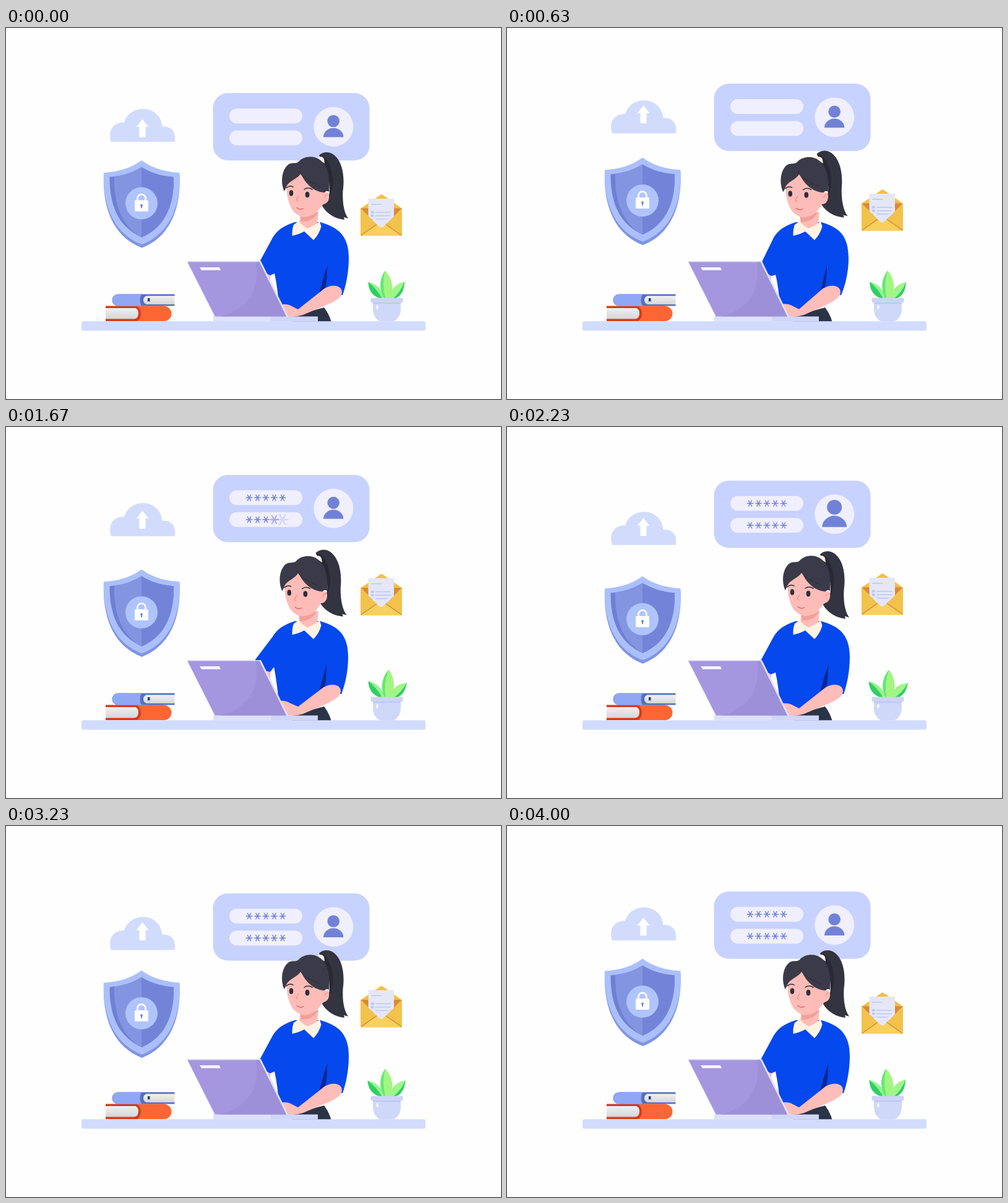
Animation, 800 px wide and 600 px high, one loop 4.03 s. Source, as an HTML page:

```html
<!DOCTYPE html>
<html lang="en">
<head>
<meta charset="utf-8">
<title>Secure sign-in</title>
<style>
  html, body { margin: 0; width: 100%; height: 100%; overflow: hidden; background: #fefefe; }
  svg { display: block; width: 100vw; height: 100vh; }
</style>
</head>
<body>
<svg viewBox="0 0 800 600">
  <defs>
    <path id="star" d="M-5.300 0H5.300M-2.900 -5L2.900 5M2.900 -5L-2.900 5" stroke="#7182d6" stroke-width="1.400" fill="none"/>
    <linearGradient id="pages" x1="0" y1="0" x2="0" y2="1">
      <stop offset="0" stop-color="#f0f0f0"/><stop offset="1" stop-color="#d6d6d8"/>
    </linearGradient>
  </defs>

  <g id="card">
    <rect x="334.5" y="105.2" width="253" height="108.8" rx="24" fill="#c7d2fe"/>
    <g fill="#f0effd">
      <rect x="361" y="130" width="118" height="24" rx="12"/>
      <rect x="361" y="165.5" width="118" height="24" rx="12"/>
      <circle cx="529.3" cy="159.5" r="32"/>
    </g>
    <g id="user" fill="#7182d6">
      <circle cx="529.2" cy="150.3" r="9.8"/>
      <path d="M513 176.300A16.200 14.800 0 0 1 545.400 176.300Z"/>
    </g>
    <g id="stars"></g>
  </g>

  <path id="cloud" fill="#d1dcfd" d="M170 185C164 168 173 152.500 191 153.500C195 140 207 131.500 221 131.500C238 131.500 251 143 252.500 160C268 159 276 170 272.500 185Z"/>
  <path id="arrow" fill="#fff" d="M220.500 148L230.500 160.500H225.500V177H215.500V160.500H210.500Z"/>

  <g id="shield">
    <path fill="#7f95e2" d="M219 221Q240 238 280.500 238C283 292 265 338 219.500 355.500C174 338 156 292 158 238Q198 238 219 221Z"/>
    <path fill="#abc0fb" d="M219 214Q243 232 280.500 234C283 287 265 333 219.500 350C174 333 156 287 158 234Q195 232 219 214Z"/>
    <path fill="#6e80d4" d="M219 225Q241 239 271 241C272 287 257 322 219.500 338.500C182 322 167 287 167.500 241Q197 239 219 225Z"/>
    <path fill="#8395e0" d="M219 225V338.500C188 321 174 287 175 240Q199 238 219 225Z"/>
    <path fill="#7384d8" d="M219 225V338.500C257 322 272 287 271 241Q241 239 219 225Z"/>
    <circle cx="219" cy="283.500" r="26" fill="#b0c4fc"/>
    <path d="M212.500 280V275.500A6.500 6.500 0 0 1 225.500 275.500V280" fill="none" stroke="#fff" stroke-width="2.600"/>
    <rect x="208" y="278.500" width="22" height="18" rx="1.500" fill="#fff"/>
    <path d="M219 284.800a2 2 0 0 1 1 3.700V291.500h-2V288.500a2 2 0 0 1 1 -3.700Z" fill="#7182d6"/>
  </g>

  <g id="mail">
    <path d="M573 292L605 270Q607 268.500 609 270L640 292Z" fill="#f2c044"/>
    <path d="M573 291.500H640L607 326Z" fill="#d78b36"/>
    <path d="M585.500 276H627V306L607 324.500L585.500 306Z" fill="#e5e7f7"/>
    <g stroke="#b9c5f3" stroke-width="1.400">
      <path d="M590 285H607M597 298H622M597 303.500H622M597 309H622M612 316H618"/>
      <path d="M590 298H594.500M590 303.500H594.500M590 309H594.500" stroke-width="3.500"/>
    </g>
    <path d="M573 291.500L603 321.500Q606.500 325 610 321.500L640 291.500V336H573Z" fill="#f3c24b"/>
    <path d="M573 336L602 316.500Q606.500 313.500 611 316.500L640 336Z" fill="#f9d05c" clip-path="inset(0)"/>
    <path d="M574 335L599 317.500M639 335L614 317.500" stroke="#d4933c" stroke-width="1.500"/>
    <path d="M585.500 303L603 321Q606.500 324.500 610 321L627 303L607 314Z" fill="#e5e7f7"/>
  </g>

  <path d="M464 466L514 452Q522 462 525.500 475H462Z" fill="#2b3347"/>
  <g id="woman">
    <path id="leftHand" fill="#fdbcb7"/>
    <path id="leftArm" fill="#0448ee"/>
    <path id="torso" fill="#0448ee"/>
    <path id="sleeve" fill="#0448ee"/>
    <path id="fold" fill="#04278f"/>
    <path id="forearm" fill="#febdb9"/>
    <path d="M476 298H505L503 317L486 330L474 315Z" fill="#fdbcb7"/>
    <g id="head">
      <g id="tail">
        <path fill="#343340" d="M506 206C512 200 523 199 531 206C546 219 547 246 544.500 263C543.500 282 546 298 553 308L546 306L547 310C532 309 518 300 510.500 287C522 281 526 266 524 248Z"/>
        <path fill="#292835" d="M507 206C519 208 526 224 528 242C530 257 525 271 520 277Q526 262 520 240Z"/>
      </g>
      <path fill="#f8f1e6" d="M504 209Q511 206 514 212L515 219L507 214Z"/>
      <path fill="#f29f99" d="M476 303Q490 309 505 296L503 301Q494 314 477 313Z"/>
      <path fill="#fdbcb7" d="M453 246C453 270 456 284 464 296Q472 304 481 306C494 305 506 297 512 285C520 285 523 277 522 270Q521 264 515 266L508 232L470 226Z"/>
      <path fill="#3b3a48" d="M449.500 264C443 249 446 229 456 221C463 216 470 221 474 215C484 206 499 207 507 213C521 222 524 244 522 265Q518 262 515 266C502 266 485 256 476.500 235C470 246 455 247 452.500 259Z"/>
      <path d="M474 232C481 246 496 249 507 256" stroke="#2c2b37" fill="none"/>
      <g fill="#302d3a">
        <ellipse cx="461" cy="267" rx="3.300" ry="4.700"/><ellipse cx="487" cy="269.500" rx="3.400" ry="4.700"/>
      </g>
      <g fill="none" stroke-linecap="round">
        <path d="M453.500 258.500Q458 254 464 257M482 261Q488 256.500 495 261" stroke="#302d3a" stroke-width="1.500"/>
        <path d="M473 271Q471 275 469 278L472 280" stroke="#ec8580"/>
        <path d="M470 290.500Q475 295 480.500 292" stroke="#d95f66" stroke-width="1.200"/>
        <path d="M515 274Q517 269 520 270" stroke="#ec8580"/>
      </g>
    </g>
    <path fill="#fdf3e4" d="M473 312.500L465 318Q462 326 462.500 336Q473 334 482 329L497 343Q506 334 509.500 321L507 313Q496 321 487 324Q478 319 473 312.500Z"/>
  </g>

  <path d="M335 466H456V474.500H335Z" fill="#dee1f9"/>
  <path d="M428 466.500H504V474.500H428Z" fill="#d0d6f6"/>
  <path d="M292 377H412L456.500 467H337Z" fill="#dfe0fa"/>
  <path d="M293.500 378.500H409.500L453 466.500H338Z" fill="#a497df"/>
  <path d="M404 378.500H409.500L453 466.500H346C389 455 411 427 404 378.500Z" fill="#9d90d9"/>
  <path d="M313 387H345L347 391.800H316Z" fill="#f7f5ff"/>

  <g id="books">
    <path d="M161 449.500H255A12.300 12.300 0 0 1 255 474H161V470H210V453H161Z" fill="#d83a17"/>
    <path d="M161 453H207Q214 453 214 461.500T207 470.500H161Z" fill="url(#pages)"/>
    <path d="M216 450H255.500A12 12 0 0 1 255.500 474H212Q218 470 218 462T212 450Z" fill="#fc6635"/>
    <path d="M272.500 430.500H181A9.500 9.500 0 0 0 181 449.500H272.500V446.500H226V433.500H272.500Z" fill="#5570bf"/>
    <path d="M219 430.500H181.500A9.500 9.500 0 0 0 181.500 449.500H219Q214 440 219 430.500Z" fill="#90a7f4"/>
    <path d="M272.500 433.500H228Q222 434 222 440T228 446.800H272.500Z" fill="url(#pages)"/>
    <path d="M229 437H232.500V443L230.800 441.500L229 443Z" fill="#1c3b86"/>
  </g>

  <g id="leafLeft">
    <path d="M606 438C590 433 586 422 585.500 411C599 415 608 425 611 438Z" fill="#2fcf63"/>
    <path d="M608 438Q599 421 585.500 411C601 414 609 425 612 438Z" fill="#92f58e"/>
  </g>
  <g id="leafRight">
    <path d="M619 438C621 422 630 414 644 410C643 424 637 433 626 438Z" fill="#a0f58a"/>
    <path d="M625 438Q638 427 644 410C643.500 426 638 434 628 438Z" fill="#2fcf63"/>
  </g>
  <g id="leafMid">
    <path d="M612 438C601 420 605 404 612.500 392.500C624 404 629 423 619 438Z" fill="#a3f582"/>
    <path d="M612 438C601 420 605 404 612.500 392.500Q607 416 613.500 438Z" fill="#62e878"/>
  </g>
  <path d="M593 443H638V455Q637 470 626 474.500H605Q594 470 593 455Z" fill="#cfd8f9"/>
  <path d="M593 443.500H638V446H593Z" fill="#bcc7f0"/>
  <rect x="589.500" y="436.500" width="52" height="7.500" rx="1.500" fill="#cdd4f5"/>
  <ellipse cx="600" cy="451.500" rx="1.800" ry="3.600" fill="#f3f5ff"/>

  <rect x="122" y="474.300" width="556" height="15.200" rx="3" fill="#d1dcfd"/>
</svg>
<script>
const LOOP = 4030;
const byId = id => document.getElementById(id);
const set = (id, name, value) => byId(id).setAttribute(name, value);
const clamp = x => Math.max(0, Math.min(1, x));
const smooth = (t, from, to) => {
  const p = clamp((t - from) / (to - from));
  return p * p * (3 - 2 * p);
};
// Cosine wave that peaks at the given time.
const wave = (t, peak, cycles = 1) => Math.cos((t - peak) / LOOP * 2 * Math.PI * cycles);
const move = (id, y) => set(id, 'transform', `translate(0 ${y})`);

// Smooth curve through [time, value] keys, at rest at both ends.
function curve(keys, t) {
  const last = keys.length - 1;
  if (t >= keys[last][0]) return keys[last][1];
  const i = keys.findIndex((k, n) => n < last && t < keys[n + 1][0]);
  const slope = n => n <= 0 || n >= last ? 0 :
    (keys[n + 1][1] - keys[n - 1][1]) / (keys[n + 1][0] - keys[n - 1][0]);
  const [t0, a] = keys[i], [t1, b] = keys[i + 1];
  const d = t1 - t0, p = (t - t0) / d, q = 1 - p;
  return a * (1 + 2 * p) * q * q + b * p * p * (3 - 2 * p) +
    d * p * q * (slope(i) * q - slope(i + 1) * p);
}

const poseTimes = [0, 630, 1030, 1670, 2130];
const pose = (t, ...values) => curve(poseTimes.map((time, i) => [time, values[i]]), t);

const stars = Array.from({ length: 10 }, () => {
  const star = document.createElementNS('http://www.w3.org/2000/svg', 'use');
  star.setAttribute('href', '#star');
  return byId('stars').appendChild(star);
});

function drawStars(t) {
  stars.forEach((star, i) => {
    const p = clamp((t - 650 - i * 107) / 267);
    const x = 393 + i % 5 * 13.5, y = i < 5 ? 142 : 177.500;
    star.setAttribute('transform', `translate(${x} ${y}) scale(${2 - p})`);
    star.setAttribute('opacity', p);
  });
}

function drawWoman(t) {
  const lean = smooth(t, 0, 560) - smooth(t, 1690, 2130);
  const elbow = pose(t, 0, -4, -6, -2, 0);
  const reach = pose(t, 0, 2, -3.5, -8, 0);
  const hand = pose(t, 0, -0.5, -4, -4, 0);
  const side = 554 + pose(t, 0, -2, -2, -1, 0);
  const armpit = `${434 + reach * .1} ${397 + reach * 1.1}`;

  set('head', 'transform', `translate(${-2.5 * lean} ${0.5 * lean}) rotate(${-lean} 488 310)`);
  set('tail', 'transform', `translate(${-lean} ${-2.5 * lean}) rotate(${-0.8 * lean} 515 215)`);
  set('leftHand', 'd', `M412 386L428 ${396 + reach * .5}L427 407L424 412Z`);
  set('leftArm', 'd', `M467 314C448 320 438 327 431 339L${411 + reach} 376L${407 + reach} 390
    L427 ${400 + reach * .5}L${armpit}L460 380Z`);
  set('torso', 'd', `M467 314L508 314Q530 322 535 345L518 385L508 430L500 448L470 460L441 449
    Q439 420 ${armpit}L431 339Z`);
  set('sleeve', 'd', `M507 314C537 322 ${side} 336 ${side} 372
    C${side} 396 ${549 + elbow * .7} 418 ${544 + elbow} 432
    L${528 + elbow} 430L${506 + elbow * .3} 432L518 385L505 340Z`);
  set('fold', 'd', `M${519 + elbow * .5} 383L506 429L${516 + elbow * .6} 420
    Q${519 + elbow * .7} 410 ${519 + elbow * .5} 383Z`);
  set('forearm', 'd', `M${515 + elbow} 421Q${530 + elbow} 413 ${540 + elbow} 420
    Q${546 + elbow} 426 ${540 + elbow} 435Q${535 + elbow} 440 ${525 + elbow * .7} 445L480 464
    Q464 469 ${450 + hand} 466L${446 + hand} ${447 + hand}
    Q${455 + hand} ${446 + hand} ${462 + hand} ${450 + hand}L472 ${455 + hand * .7}Z`);
}

function update(t) {
  move('card', 94 + 16.8 * wave(t, 3515) - 105.5);
  move('shield', 226 + 16.8 * wave(t, 2515) - 214);
  move('mail', 319.3 + 16.8 * wave(t, 4000) - 336);
  const cloud = 184.8 + 16.8 * wave(t, 3005) - 185;
  move('cloud', cloud);
  move('arrow', cloud - 4.2 + 4.3 * wave(t, 0, 3));

  const pulse = smooth(t, 1900, 2230) - smooth(t, 2230, 2560);
  set('user', 'transform', `translate(529.2 159) scale(${1 + .23 * pulse}) translate(-529.2 -159)`);

  set('leafMid', 'transform', `rotate(${4.1 * (wave(t, 1650) + .84)} 615 438)`);
  set('leafLeft', 'transform', `rotate(${2.3 * (wave(t, 850) - .24)} 608 438)`);
  set('leafRight', 'transform', `rotate(${4.6 * (wave(t, 2015) + 1)} 622 438)`);

  drawStars(t);
  drawWoman(t);
}

const start = performance.now();
function frame() {
  update((performance.now() - start) % LOOP);
  requestAnimationFrame(frame);
}
update(0);
requestAnimationFrame(frame);
</script>
</body>
</html>
```
